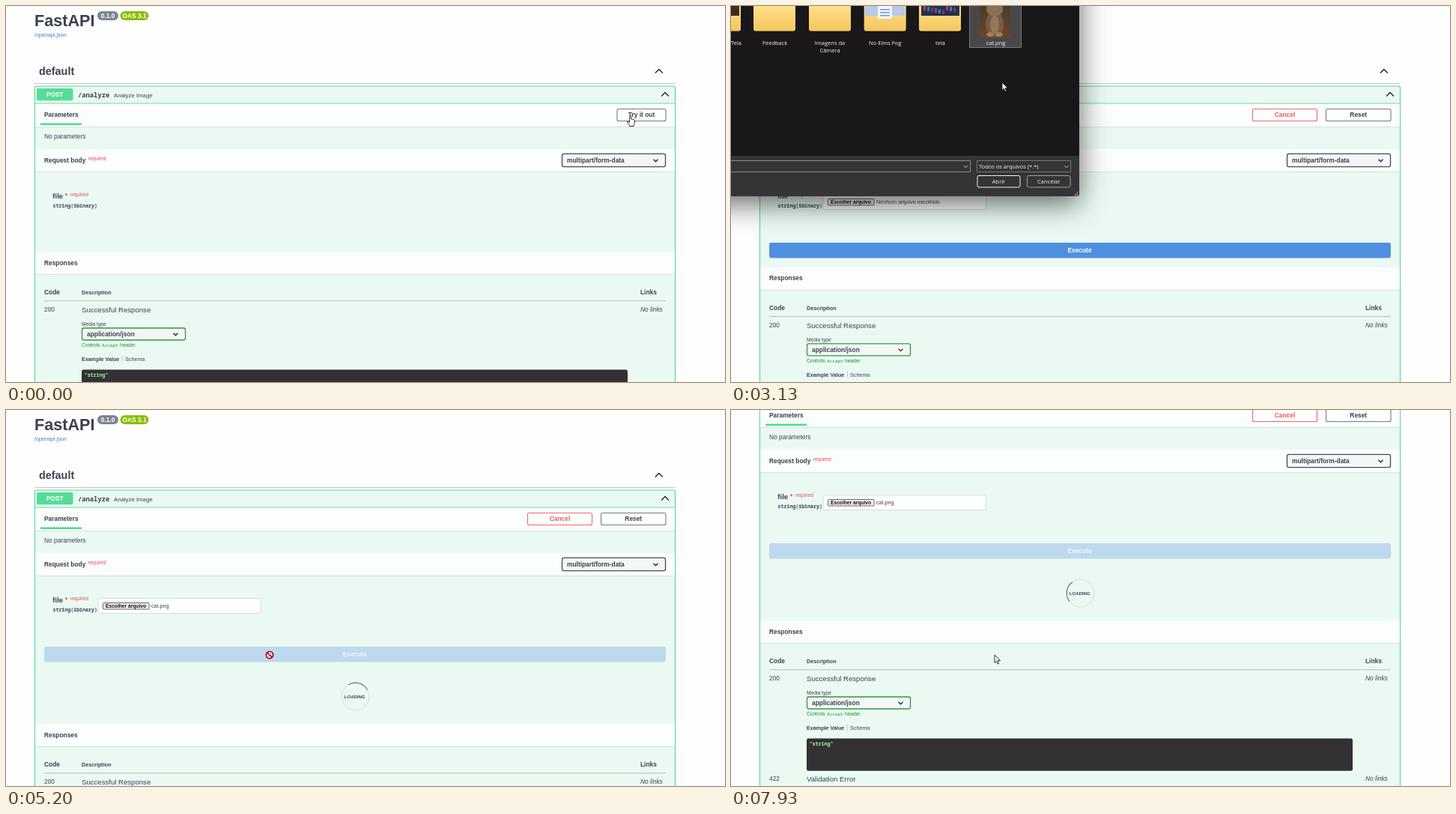
Recreate the animation shown at these times as an HTML page with a canvas. Size 960 by 502 pixels, loop 8 s.

```html
<!DOCTYPE html>
<html lang="pt">
<head>
<meta charset="utf-8">
<title>API docs</title>
<style>
html, body { margin: 0; width: 100%; height: 100%; overflow: hidden; background: #fefefe; }
canvas { display: block; }
</style>
</head>
<body>
<canvas id="stage" width="960" height="502"></canvas>
<script>
const ctx = document.getElementById('stage').getContext('2d');
const LOOP = 8000;
const TRY = 200, OPEN = 2030, PICK = 2780, CLOSE = 3870, EXECUTE = 5000;
const INK = '#3b4151', GREEN = '#49cc90', RED = '#f04850', PALE = '#eafaf2', STRIP = '#fbfefd';
const SANS = '"Liberation Sans", Arial, sans-serif';
const MONO = '"Noto Sans Mono", "DejaVu Sans Mono", monospace';
const UI = '"Open Sans", "Noto Sans", sans-serif';

// Pointer stops: time, x, y
const STOPS = [
  [0, 834, 146], [260, 834, 146], [1330, 185, 269], [1600, 166, 263], [OPEN, 166, 263],
  [2700, 354, 28], [2840, 354, 28], [3130, 362, 102], [3600, 350, 231], [CLOSE, 350, 231],
  [4000, 363, 255], [4500, 352, 327], [LOOP, 352, 327]
];

const smooth = (t, from, to) => {
  const u = Math.min(1, Math.max(0, (t - from) / (to - from)));
  return u * u * (3 - 2 * u);
};

function text(str, x, y, size, { color = INK, style = '', font = SANS, align = 'left' } = {}) {
  ctx.font = `${style} ${size}px ${font}`;
  ctx.fillStyle = color;
  ctx.textAlign = align;
  ctx.fillText(str, x, y);
}
const bold = (str, x, y, size = 8.4, opts = {}) => text(str, x, y, size, { style: 'bold', ...opts });
const mono = (str, x, y, size, color = INK) => bold(str, x, y, size, { font: MONO, color });

function rect(x, y, w, h, color) {
  ctx.fillStyle = color;
  ctx.fillRect(x, y, w, h);
}

function box(x, y, w, h, r, fill, border, width = 1) {
  ctx.beginPath();
  ctx.roundRect(x, y, w, h, r);
  if (fill) { ctx.fillStyle = fill; ctx.fill(); }
  if (border) { ctx.strokeStyle = border; ctx.lineWidth = width; ctx.stroke(); }
}

function line(points, color, width) {
  ctx.beginPath();
  for (const [x, y] of points) ctx.lineTo(x, y);
  ctx.strokeStyle = color;
  ctx.lineWidth = width;
  ctx.stroke();
}

// Positive h points up, negative points down
const chevron = (x, y, w, h, color = '#222', width = 1.3) =>
  line([[x - w, y + h / 2], [x, y - h / 2], [x + w, y + h / 2]], color, width);

function strip(y) {
  rect(39, y, 854, 30, STRIP);
  rect(39, y + 30, 854, 1, '#d6e2de');
}

function button(label, x, w, color, border) {
  box(x, 137.5, w, 16, 2, '#fdfffe', border, 1.1);
  bold(label, x + w / 2, 148, 8.4, { color, align: 'center' });
}

function select(label, x, y, w, h, border) {
  box(x, y, w, h, 2.4, '#f5f6f6', border, 1.3);
  bold(label, x + 6.5, y + h / 2 + 3, 8.4);
  chevron(x + w - 13, y + h / 2 + .3, 3, -3);
}

function fileField(name) {
  box(123, 251.5, 217.5, 20, 2.4, '#fff', '#d8dcda');
  box(129.5, 257.5, 61.5, 8.5, 1, '#efefef', '#555', .9);
  bold('Escolher arquivo', 133, 264, 6.67, { color: '#111' });
  text(name, 194, 264.2, 7.2);
}

function loader(t) {
  const mid = (188 + (t - 5930) * .36) * Math.PI / 180;
  ctx.lineWidth = 1.1;
  ctx.strokeStyle = 'rgba(85,85,85,.13)';
  ctx.beginPath();
  ctx.arc(466.5, 382.5, 18.3, 0, 7);
  ctx.stroke();
  ctx.strokeStyle = '#66706c';
  ctx.beginPath();
  ctx.arc(466.5, 382.5, 18.3, mid - .8, mid + .8);
  ctx.stroke();
  bold('LOADING', 465.7, 384.7, 6, { align: 'center' });
}

function responses() {
  strip(328);
  bold('Responses', 51, 345.5);
  bold('Code', 51, 385);
  bold('Description', 101, 384.8, 7.2);
  bold('Links', 847, 385);
  rect(51, 393.3, 830, 1, '#b3c0bc');
  [['200', 'Successful Response'], ['422', 'Validation Error']].forEach(([code, label], i) => {
    const y = 134 * i;
    text(code, 51, 407.7 + y, 8.4);
    text(label, 101, 409 + y, 9.6);
    text('No links', 847, 407.7 + y, 8.4, { style: 'italic' });
  });
  text('Media type', 101, 427, 6.7);
  select('application/json', 101.5, 430, 138, 16, '#2c9a3c');
  const note = { color: '#1c8f2c' };
  text('Controls', 101, 455.2, 6.6, note);
  text('Accept', 128, 455.2, 6.1, { ...note, font: MONO });
  text('header.', 152, 455.2, 6.6, note);
  bold('Example Value', 101, 474, 7.2);
  rect(155, 467, .7, 8, '#b0b8b6');
  text('Schema', 159, 474, 7.2);
  box(101, 485.5, 729, 43.3, 2.4, '#333133');
  mono('"string"', 104.7, 495.3, 6.6, '#a2fca2');
}

function page(t) {
  const active = t >= TRY, loading = t >= EXECUTE;

  bold('FastAPI', 38, 26.8, 21.6);
  box(122, 7, 28, 12, 6, '#7d8492');
  bold('0.1.0', 136, 16.2, 8.4, { color: '#fff', align: 'center' });
  box(152.5, 7, 38, 12, 6, '#89bf04');
  bold('OAS 3.1', 171.5, 16.2, 8.4, { color: '#fff', align: 'center' });
  text('/openapi.json', 38, 41, 7.2, { color: '#3f7fc8' });

  bold('default', 44, 92, 14.4);
  chevron(871.8, 87, 5, 5);
  rect(38, 103, 856, 1, '#c6c8cc');

  box(38.5, 107, 855, 900, 2.4, PALE, '#5fd69b', 1.2);
  box(41, 110, 48.5, 16.3, 2, '#55dd95');
  bold('POST', 65.3, 121, 8.4, { color: '#fff', align: 'center' });
  mono('/analyze', 96, 122, 8.8);
  text('Analyze Image', 144, 121.7, 7.8);
  chevron(880, 118, 5, 5);
  rect(39, 129.5, 854, 1, '#7fdcae');

  strip(131);
  bold('Parameters', 51, 148);
  rect(46, 156.5, 55, 2.5, '#49e08a');
  if (active) {
    button('Cancel', 696.5, 86, '#ea5a62', '#f0686e');
    button('Reset', 794.5, 86.5, INK, '#777b84');
  } else {
    button('Try it out', 816, 65, INK, '#777b84');
  }
  text('No parameters', 51, 177, 8.4);

  strip(191);
  bold('Request body', 51, 209);
  text('required', 109.5, 205.7, 6.5, { color: RED });
  select('multipart/form-data', 742.5, 197.3, 138, 17.4, '#474b55');

  bold('file', 62.3, 257, 9.6);
  bold('*', 79, 256, 8.4, { color: RED });
  text('required', 86, 254, 6.5, { color: RED });
  mono('string($binary)', 62.5, 268.5, 6.6);

  if (active) {
    fileField(t < CLOSE ? 'Nenhum arquivo escolhido' : 'cat.png');
    box(51, 316, 830, 20.5, 2.4, loading ? '#bed9ed' : '#4f90de');
    bold('Execute', 465.5, 328.8, 8.4, { color: loading ? '#f1f8fa' : '#fff', align: 'center' });
  }
  if (loading) loader(t);

  ctx.save();
  ctx.translate(0, loading ? 91 : active ? 20.8 : 0);
  responses();
  ctx.restore();
}

function folder(x) {
  const fill = ctx.createLinearGradient(0, 0, 0, 34);
  fill.addColorStop(0, '#ffe08a');
  fill.addColorStop(1, '#f3c65c');
  box(x - 28, -22, 56, 55.5, 3, fill);
}

function catThumb() {
  const fill = ctx.createLinearGradient(0, 0, 0, 42);
  fill.addColorStop(0, '#4a3a2c');
  fill.addColorStop(1, '#6e4428');
  rect(332, -20, 40, 62, fill);
  for (const [x, y, rx, ry, color] of [
    [352, 24, 12, 17, '#755c44'], [352, 4, 11, 10, '#8a7053'], [352, 25, 6, 12, '#93795a'],
    [346, 38, 5, 3, '#a0825f'], [358, 38, 5, 3, '#a0825f']
  ]) {
    ctx.fillStyle = color;
    ctx.beginPath();
    ctx.ellipse(x, y, rx, ry, 0, 0, 7);
    ctx.fill();
  }
}

function dialog(t) {
  const label = (str, x, y, color = '#f4f4f4') => text(str, x, y, 7.5, { color, font: UI, align: 'center' });

  ctx.save();
  ctx.shadowColor = 'rgba(0,0,0,.6)';
  ctx.shadowBlur = 38;
  ctx.shadowOffsetY = 10;
  box(-60, -60, 525, 314, 3, '#353335');
  ctx.restore();
  rect(0, 0, 465, 200, '#191719');

  [-15, 58, 132, 205.7, 279].forEach(folder);
  rect(0, 0, 11, 13, '#3c2c24');
  rect(179, 0, 53, 13, '#b9c9e6');
  rect(196, 0, 19, 17, '#f4f6fa');
  for (const y of [4, 8, 12]) rect(199, y, 13, 1.5, '#6b9bd0');
  rect(254, 0, 51, 13, '#26304c');
  for (let i = 0; i < 9; i++) rect(257 + i * 5, (i * 7) % 6, 3, 6, ['#b03a52', '#2f7fa8', '#6a3c80'][i % 3]);

  if (t >= PICK) box(318.5, -5, 69, 60.5, 0, '#48484a', '#77787a');
  catThumb();

  label('Tela', 7, 52);
  label('Feedback', 58.7, 52);
  label('Imagens da', 132, 52);
  label('Câmera', 132, 62);
  label('No Elms Fog', 205.7, 52);
  label('tela', 279.5, 52);
  label('cat.png', 353.5, 52);

  box(-5, 206.5, 324.5, 15, 0, '#353335', '#8c8b8c');
  chevron(313.5, 214.5, 2.7, -2.7, '#ddd', .9);
  box(328.5, 206.5, 125, 15, 0, '#353335', '#777');
  text('Todos os arquivos (*.*)', 331, 217, 7.5, { color: '#f4f4f4', font: UI });
  chevron(448, 214.5, 2.7, -2.7, '#ddd', .9);
  box(329, 226.5, 57, 15.5, 2, '#353335', '#f0f0f0');
  label('Abrir', 357.5, 237);
  box(395.5, 226.5, 57.5, 15.5, 2, '#353335', '#a0a0a0');
  label('Cancelar', 424.3, 237);
  for (let i = 0; i < 3; i++)
    for (let j = 0; j <= i; j++) rect(462 - j * 2, 248 + i * 2, 1.2, 1.2, '#bbb');
}

function shape(points) {
  ctx.beginPath();
  for (const [x, y] of points) ctx.lineTo(x, y);
  ctx.closePath();
  ctx.fillStyle = '#fff';
  ctx.strokeStyle = '#1a1a1a';
  ctx.lineWidth = .9;
  ctx.lineJoin = 'round';
  ctx.fill();
  ctx.stroke();
}

const arrow = () =>
  shape([[0, 0], [0, 10.5], [2.3, 8.3], [4, 12], [5.6, 11.3], [4, 7.6], [7.3, 7.6]]);

function hand() {
  shape([[-1.3, .8], [-.3, 0], [.7, .8], [.7, 5], [2.2, 4.8], [2.8, 5.6], [4, 5.4], [4.5, 6.3],
    [5.4, 6.6], [5.4, 10.5], [4, 13], [4, 14.5], [-1.5, 14.5], [-2, 12.5], [-4.6, 9], [-3.8, 7.8], [-1.3, 9.5]]);
}

function blocked() {
  ctx.beginPath();
  ctx.arc(0, 0, 4.6, 0, 7);
  ctx.fillStyle = '#fbeeee';
  ctx.fill();
  ctx.strokeStyle = '#a3142a';
  ctx.lineWidth = 1.9;
  ctx.stroke();
  line([[-3.2, -3.2], [3.2, 3.2]], '#a3142a', 1.9);
}

function pointer(t) {
  const i = STOPS.findIndex(s => s[0] > t);
  const [t0, x0, y0] = STOPS[i - 1], [t1, x1, y1] = STOPS[i];
  const u = smooth(t, t0, t1);
  const x = x0 + (x1 - x0) * u, y = y0 + (y1 - y0) * u;
  const overExecute = t > CLOSE && t < EXECUTE && y > 316;
  ctx.save();
  ctx.translate(x, y);
  if (t < 420 || overExecute) hand();
  else if (t >= EXECUTE && t < 6100) blocked();
  else arrow();
  ctx.restore();
}

function draw(now) {
  const t = now % LOOP;
  rect(0, 0, 960, 502, '#fefefe');
  ctx.save();
  ctx.translate(0, -138 * smooth(t, 5766, 6556));
  page(t);
  ctx.restore();
  if (t >= OPEN && t < CLOSE) dialog(t);
  pointer(t);
}

const start = performance.now();
function tick() {
  draw(performance.now() - start);
  requestAnimationFrame(tick);
}
tick();
</script>
</body>
</html>
```
